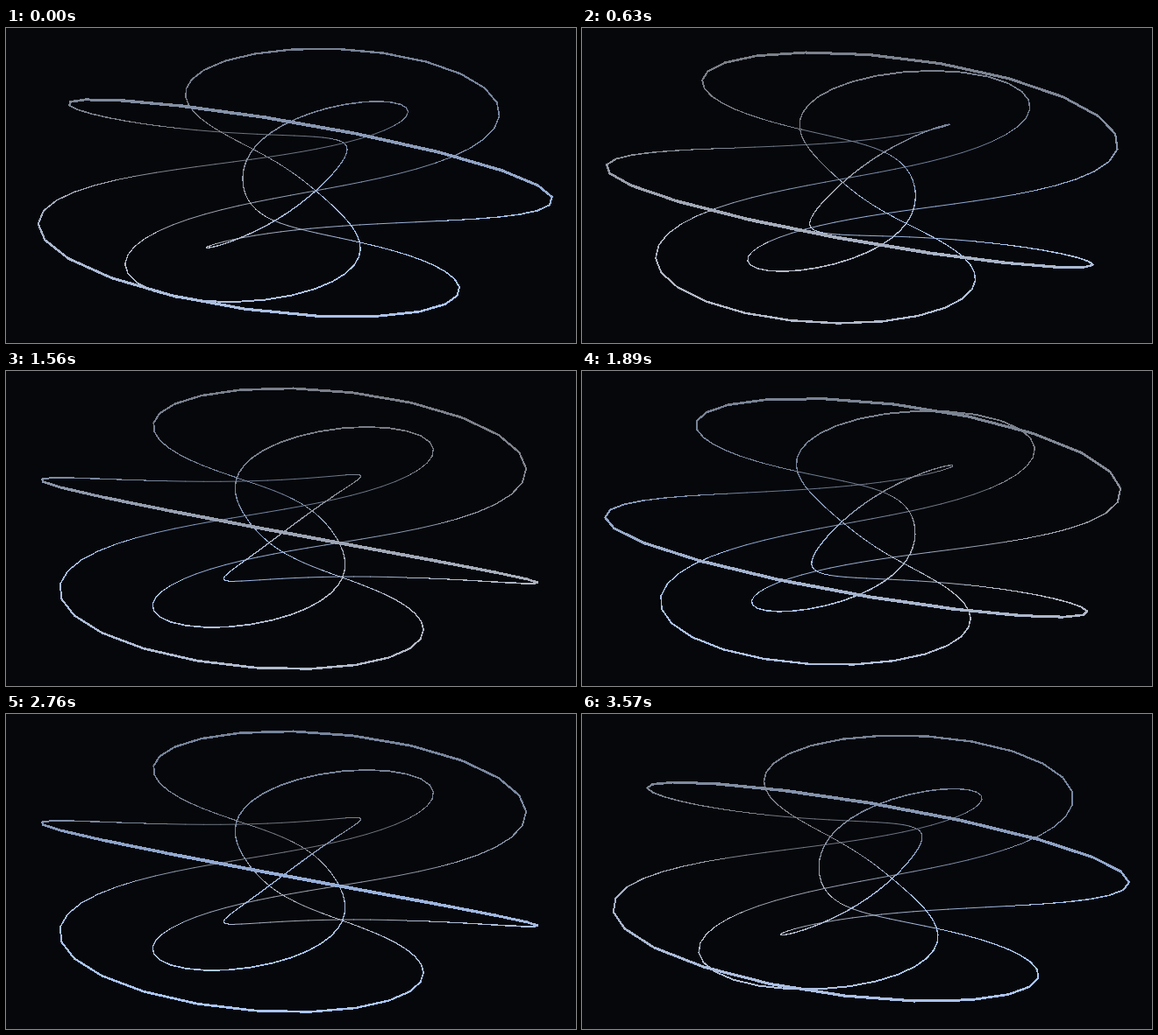
Recreate the animation shown at these times as an HTML page. Size 650 px wide and 360 px high, loop 3.6 s.

```html
<!DOCTYPE html>
<html lang="en">
<head>
<meta charset="utf-8">
<title>Torus link</title>
<style>
  html, body { margin: 0; width: 100%; height: 100%; overflow: hidden; background: #05070b; }
  svg { display: block; width: 650px; height: 360px; }
  line { stroke-linecap: round; shape-rendering: crispEdges; }
</style>
</head>
<body>
<svg id="stage" viewBox="0 0 650 360"></svg>
<script>
const LOOP = 3600, STEP = 30;
const CX = 325, CY = 180;
const DIST = 180 / Math.tan(Math.PI / 6);   // camera distance and focal length
const RING = 135, TUBE = 81;
const STRANDS = 3, SIDES = 80;
const START = 33.3;                         // turn of the body at time zero, degrees
const WEIGHT = 1.2;
const GREY = [178, 184, 197], BLUE = [169, 197, 245];

const svg = document.getElementById('stage');
const rad = deg => deg * Math.PI / 180;
const lines = Array.from({ length: STRANDS * SIDES }, () =>
  svg.appendChild(document.createElementNS('http://www.w3.org/2000/svg', 'line')));

// One vertex of a strand: two turns round the ring, one round the tube.
function vertex(strand, i, turn) {
  const angle = rad(START + 120 * strand + 720 * i / SIDES - turn);
  const tilt = rad(-360 * i / SIDES);
  const radius = RING + TUBE * Math.cos(tilt);
  const z = radius * Math.cos(angle);
  const scale = DIST / (DIST - z);
  return {
    angle, z, scale,
    height: Math.sin(tilt),
    x: CX + radius * Math.sin(angle) * scale,
    y: CY - TUBE * Math.sin(tilt) * scale
  };
}

// Darker towards the top; the blue tint circles the ring.
function shade(angle, height, blueAngle) {
  const light = 0.84 - 0.17 * Math.tanh(2 * (height - 0.1));
  const tint = 0.5 + 0.5 * Math.cos(angle - blueAngle);
  const mix = tint * (height > 0 ? 1 - 0.4 * height : 1);
  const rgb = GREY.map((g, k) => Math.round((g + (BLUE[k] - g) * mix) * light));
  return `rgb(${rgb})`;
}

function draw(time) {
  const turn = time * 360 / LOOP;
  const blueAngle = rad((time - 2900) * 360 / LOOP);
  const parts = [];
  for (let s = 0; s < STRANDS; s++) {
    let a = vertex(s, 0, turn);
    for (let i = 1; i <= SIDES; i++) {
      const b = vertex(s, i, turn);
      parts.push({ a, b, z: a.z + b.z });
      a = b;
    }
  }
  parts.sort((p, q) => p.z - q.z);
  parts.forEach(({ a, b }, n) => {
    const line = lines[n];
    const set = (name, value) => line.setAttribute(name, value);
    const midAngle = a.angle + rad(360 / SIDES);
    set('x1', a.x.toFixed(2));
    set('y1', a.y.toFixed(2));
    set('x2', b.x.toFixed(2));
    set('y2', b.y.toFixed(2));
    set('stroke-width', Math.max(0.9, WEIGHT * (a.scale + b.scale) / 2).toFixed(2));
    set('stroke', shade(midAngle, (a.height + b.height) / 2, blueAngle));
  });
}

const origin = performance.now();
function tick() {
  const time = (performance.now() - origin) % LOOP;
  draw(Math.floor(time / STEP) * STEP);
  requestAnimationFrame(tick);
}
tick();
</script>
</body>
</html>
```
